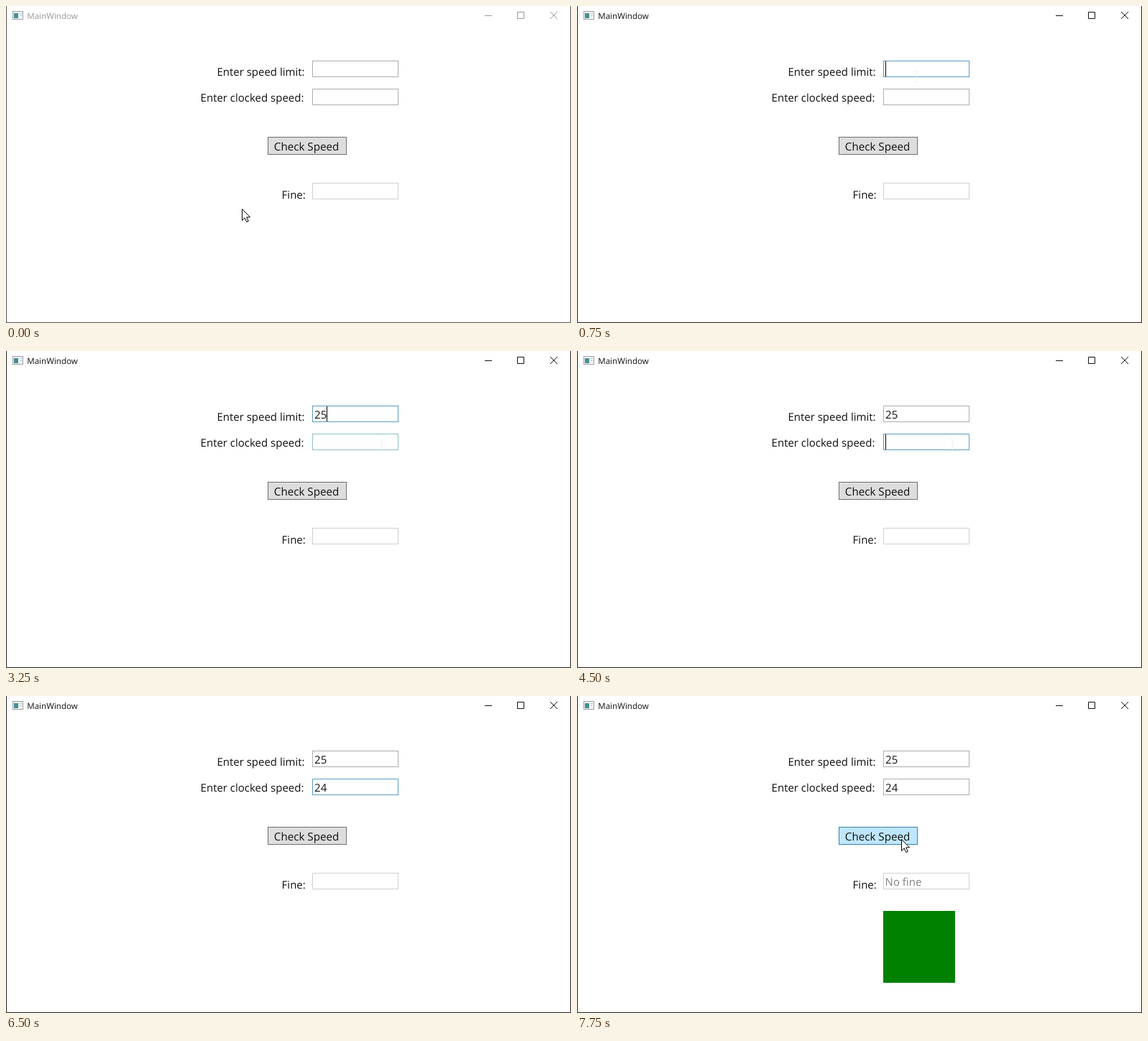
Recreate the animation shown at these times as an HTML page. Size 786x441 px, loop 8000 ms.

```html
<!DOCTYPE html>
<html lang="en">
<head>
<meta charset="utf-8">
<title>Speed check</title>
<style>
  html, body { margin: 0; width: 100%; height: 100%; overflow: hidden; background: #fff; }
  svg { display: block; width: 786px; height: 441px; }
  text { font: 15px "Open Sans", "Noto Sans", sans-serif; fill: #111; text-rendering: geometricPrecision; white-space: pre; }
  #title { font-size: 11.6px; fill: currentColor; }
  .box { fill: #fff; stroke: #abadb3; }
  #fine { stroke: #cfd0d2; }
  #button { fill: #ddd; stroke: #707070; }
  #result text { fill: #838383; }
  #chrome { color: #999; }
  #edge { color: #555; }
</style>
</head>
<body>
<svg viewBox="0 0 786 441">
  <rect width="786" height="441" fill="#fff"/>
  <path id="edge" d="M.5 0V440.5H785.5V0" fill="none" stroke="currentColor"/>

  <g id="icon">
    <rect x="9.5" y="7.5" width="14" height="11" fill="#f4f6f6" stroke="#999fa3"/>
    <rect x="11" y="10" width="6" height="7" fill="#468f93"/>
    <path d="M19 10.5h3M19 13.5h3" stroke="#b4c3cc"/>
  </g>

  <g id="chrome">
    <text id="title" x="29.2" y="18">MainWindow</text>
    <path d="M666 13.5H676M711.5 8.5H720.5V17.5H711.5ZM757 8L767 18M767 8L757 18"
          fill="none" stroke="currentColor"/>
  </g>

  <text x="293.4" y="97">Enter speed limit:</text>
  <text x="270.6" y="133">Enter clocked speed:</text>
  <text x="383.6" y="268">Fine:</text>

  <rect id="limit" class="box" x="426.5" y="76.5" width="119" height="22"/>
  <rect id="clocked" class="box" x="426.5" y="115.5" width="119" height="22"/>
  <rect id="fine" class="box" x="426.5" y="246.5" width="119" height="22"/>

  <text y="94"><tspan id="a1" x="429">2</tspan><tspan id="a2" x="437.7">5</tspan></text>
  <text y="133"><tspan id="b1" x="429">2</tspan><tspan id="b2" x="437.7">4</tspan></text>

  <rect id="button" x="364.5" y="182.5" width="109" height="24"/>
  <text x="372.8" y="201" style="font-size:15.2px">Check Speed</text>

  <g id="result">
    <text x="428.6" y="264">No fine</text>
    <rect x="426" y="299" width="100" height="100" fill="#008000"/>
  </g>

  <rect id="caret" width="1" height="21" fill="#000"/>
  <path id="beam" d="M-3 -7.5H-1M1 -7.5H3M0 -7V7M-3 7.5H-1M1 7.5H3" fill="none" stroke="#e9ecec"/>
  <path id="arrow" d="M.5 .5V16.3L4.2 12.8L6.7 18.4L9.2 17.3L6.8 11.8H11.6Z" fill="#fff" stroke="#000"/>
</svg>
<script>
  const LOOP = 8000;
  const IDLE = '#abadb3', HOVER = '#8fc0c4', FOCUS = '#5b9bc4';

  // Holds each value until the next step, forever.
  function play(id, prop, steps) {
    const frames = steps.map(([ms, value]) =>
      ({ offset: ms / LOOP, [prop]: value, easing: 'steps(1, end)' }));
    frames.push({ offset: 1, [prop]: steps[steps.length - 1][1] });
    document.getElementById(id).animate(frames, { duration: LOOP, iterations: Infinity });
  }

  // Starts hidden and toggles at each given time.
  const show = (id, ...times) =>
    play(id, 'opacity', [[0, 0], ...times.map((ms, i) => [ms, 1 - i % 2])]);

  // Each step: time, x, y.
  const move = (id, steps) =>
    play(id, 'transform', steps.map(([ms, x, y]) => [ms, `translate(${x}px, ${y}px)`]));

  // Window activation
  play('chrome', 'color', [[0, '#999'], [750, '#111']]);
  play('edge', 'color', [[0, '#555'], [750, '#222']]);

  // Fields and button
  play('limit', 'stroke', [[0, IDLE], [500, HOVER], [750, FOCUS], [3500, IDLE]]);
  play('clocked', 'stroke', [[0, IDLE], [3250, HOVER], [3500, FOCUS], [7500, IDLE]]);
  play('button', 'fill', [[0, '#ddd'], [7250, '#bee6fd']]);
  play('button', 'stroke', [[0, '#707070'], [7250, '#3c7fb1']]);

  // Typing
  show('a1', 2000);
  show('a2', 2250);
  show('b1', 5250);
  show('b2', 5750);
  show('result', 7500);

  // Text caret
  move('caret', [[0, 429, 77], [2000, 438, 77], [2250, 446, 77],
                 [3500, 429, 116], [5250, 438, 116], [5750, 446, 116]]);
  show('caret', 750, 1500, 2000, 2750, 3250, 4000, 4500, 5000, 5250, 6500, 7000, 7500);

  // Pointer
  move('beam', [[0, 472.5, 98], [3250, 522.5, 131]]);
  show('beam', 500, 5250);
  move('arrow', [[0, 328, 282], [250, 419, 111], [6750, 504, 165],
                 [7000, 463, 221], [7250, 450, 202], [7750, 451, 199]]);
  play('arrow', 'opacity', [[0, 1], [500, 0], [6750, 1]]);
</script>
</body>
</html>
```
